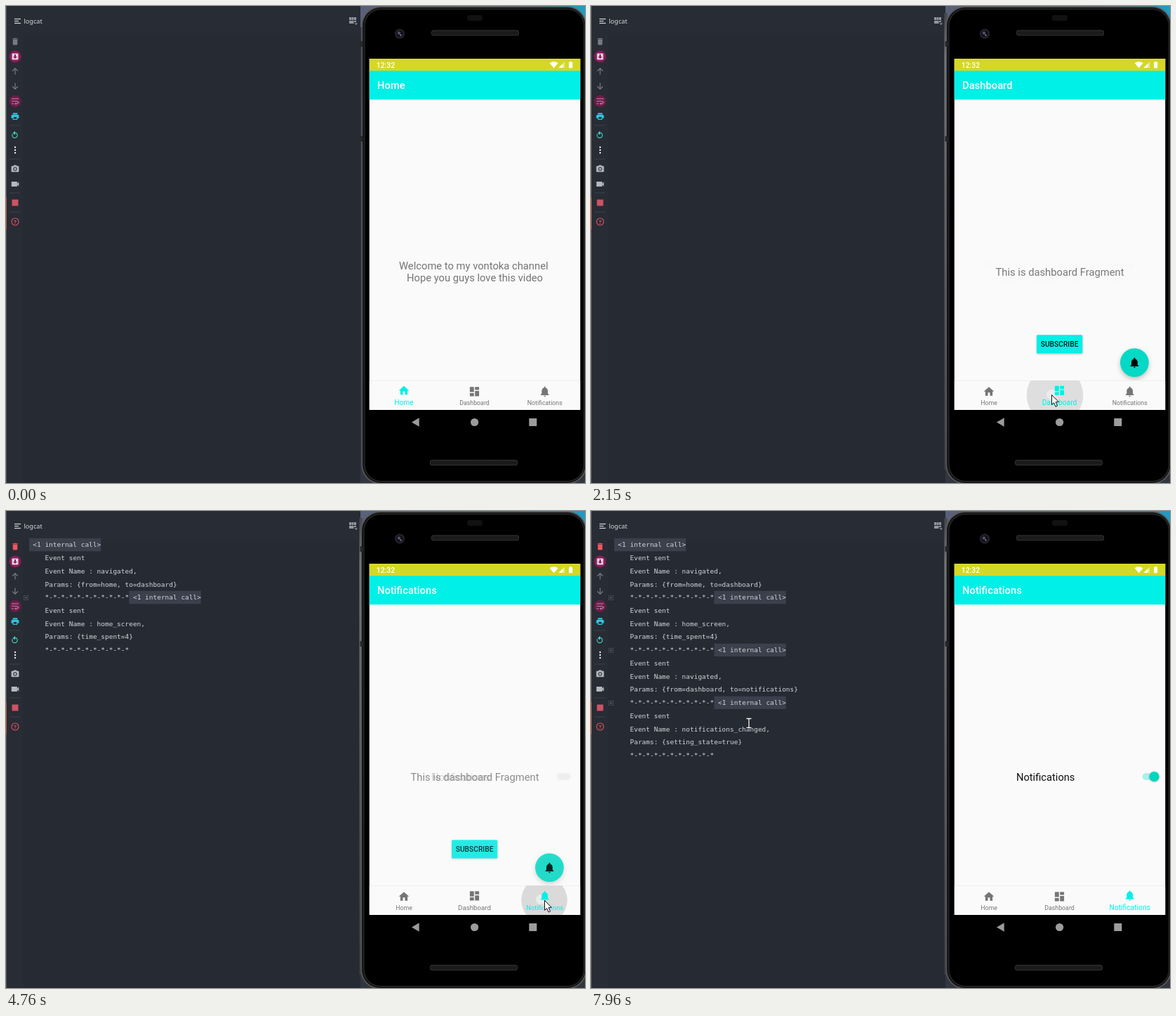
Animation of 825x679 px, one loop 8 s. Source, as an HTML page with a canvas:

```html
<!DOCTYPE html>
<html lang="en">
<head>
<meta charset="utf-8">
<title>Event log demo</title>
<style>
html, body { margin: 0; width: 825px; height: 679px; overflow: hidden; background: #262a33; }
canvas { display: block; }
</style>
</head>
<body>
<canvas id="stage" width="825" height="679"></canvas>
<script>
const LOOP = 8000;
const g = document.getElementById('stage').getContext('2d');
const ROBOTO = 'Roboto, sans-serif', MONO = '"DejaVu Sans Mono", monospace';
const CYAN = '#00f0e7', GRAY = '#757575', PAPER = '#fafafa';

const ICON = {
  home: new Path2D('M10 20v-6h4v6h5v-8h3L12 3 2 12h3v8z'),
  dash: new Path2D('M3 13h8V3H3zM3 21h8v-6H3zM13 21h8V11h-8zM13 3v6h8V3z'),
  bell: new Path2D('M12 22c1.1 0 2-.9 2-2h-4c0 1.1.89 2 2 2zm6-6v-5c0-3.07-1.64-5.64-4.5-6.32V4c0-.83-.67-1.5-1.5-1.5s-1.5.67-1.5 1.5v.68C7.63 5.36 6 7.92 6 11v5l-2 2v1h16v-1z'),
  trash: new Path2D('M6 19c0 1.1.9 2 2 2h8c1.1 0 2-.9 2-2V7H6zM19 4h-3.5l-1-1h-5l-1 1H5v2h14z'),
  print: new Path2D('M19 8H5c-1.66 0-3 1.34-3 3v6h4v4h12v-4h4v-6c0-1.66-1.34-3-3-3zM16 19H8v-5h8zM18 3H6v4h12z'),
  camera: new Path2D('M9 2L7.2 4H4c-1.1 0-2 .9-2 2v12c0 1.1.9 2 2 2h16c1.1 0 2-.9 2-2V6c0-1.1-.9-2-2-2h-3.2L15 2zM12 17a5 5 0 0 1 0-10a5 5 0 0 1 0 10z'),
  video: new Path2D('M17 10.5V6H3v12h14v-4.5l4 4v-11z')
};

// Pointer path: time, x, y
const PATH = [
  [400, 551, 644], [700, 586, 612], [1000, 636, 566], [1200, 653.5, 551], [1250, 655, 553], [1300, 656, 553],
  [2860, 656, 553], [2950, 590, 488], [3100, 340, 253], [3250, 273, 188], [3340, 271, 187], [3500, 470, 370],
  [3640, 660, 522], [3700, 704, 553], [3740, 710, 545], [3820, 730, 529], [3990, 763, 557],
  [4140, 763, 557], [4330, 767, 555], [4380, 767, 554], [5700, 767, 553], [5850, 766, 525], [6150, 779, 440],
  [6400, 789, 386], [6530, 791, 376], [7600, 791, 376], [7700, 650, 362], [7830, 390, 328], [7960, 225, 302]
];

const BLOCKS = [
  [2200, 'navigated', 'from=home, to=dashboard'],
  [2250, 'home_screen', 'time_spent=4'],
  [4930, 'navigated', 'from=dashboard, to=notifications'],
  [7510, 'notifications_changed', 'setting_state=true']
];

const TABS = [['Home', 'home', 567], ['Dashboard', 'dash', 667.5], ['Notifications', 'bell', 767.7]];
const SWITCHES = [[1930, 0, 1], [4720, 1, 2]];

const ramp = (t, a, b) => Math.min(1, Math.max(0, (t - a) / (b - a)));
const ease = p => p * p * (3 - 2 * p);
const mix = (a, b, p) => a + (b - a) * p;

function rect(x, y, w, h, color, r = 0) {
  g.fillStyle = color;
  g.beginPath();
  g.roundRect(x, y, w, h, r);
  g.fill();
}
function disc(x, y, r, color) {
  g.fillStyle = color;
  g.beginPath();
  g.arc(x, y, r, 0, 7);
  g.fill();
}
function poly(points, color) {
  g.fillStyle = color;
  g.beginPath();
  points.forEach(p => g.lineTo(...p));
  g.closePath();
  g.fill();
}
function line(points, color, w = 1.1) {
  g.strokeStyle = color;
  g.lineWidth = w;
  g.beginPath();
  points.forEach((p, i) => i ? g.lineTo(...p) : g.moveTo(...p));
  g.stroke();
}
function text(s, x, y, size, color, font = ROBOTO, align = 'left', weight = 400) {
  g.font = `${weight} ${size}px ${font}`;
  g.textAlign = align;
  g.fillStyle = color;
  g.fillText(s, x, y);
}
function icon(name, x, y, size, color) {
  g.save();
  g.translate(x - size / 2, y - size / 2);
  g.scale(size / 24, size / 24);
  g.fillStyle = color;
  g.fill(ICON[name], 'evenodd');
  g.restore();
}
function faded(alpha, draw) {
  if (alpha <= 0) return;
  g.save();
  g.globalAlpha = alpha;
  draw();
  g.restore();
}
// Shadows thin out faster than their shape so that they do not show through it
function shadow(alpha, blur, y) {
  g.shadowColor = `rgba(0,0,0,${alpha * g.globalAlpha ** 2})`;
  g.shadowBlur = blur;
  g.shadowOffsetY = y;
}

function toolbar(t) {
  rect(0, 0, 506, 42, '#282c34');
  rect(0, 42, 24, 637, '#282c34');
  rect(0, 0, 1, 679, '#50555e');
  rect(0, 272, 1, 46, '#c2543f');
  const pale = '#d4d8de', dim = '#80858e', soft = '#92969e';
  [[18.5, 9], [21.5, 6], [24.5, 9]].forEach(([y, w]) => rect(12, y - .6, w, 1.2, pale));
  text('logcat', 25.5, 24.5, 9.1, pale, '"Noto Sans", sans-serif');
  for (let i = 0; i < 3; i++) rect(489 + i * 3.5, 16, 3, 4, soft);
  rect(489, 21, 6.5, 4, soft);
  rect(496, 21, 3, 2, soft);
  poly([[496.5, 24.5], [501, 24.5], [498.8, 27]], soft);

  icon('trash', 13, 50.5, 13, t < BLOCKS[0][0] ? '#777b82' : '#f2545f');
  disc(13, 72, 8.5, '#8a1b5b');
  rect(8.5, 67.5, 9, 9, '#e3d3de', 1);
  rect(12, 69, 2, 3, '#8a1b5b');
  poly([[10, 72], [16, 72], [13, 75]], '#8a1b5b');
  for (const [y, d] of [[93, 1], [114, -1]]) {
    line([[13, y + 4.5 * d], [13, y - 4 * d]], dim);
    line([[9, y - .3 * d], [13, y - 4.2 * d], [17, y - .3 * d]], dim);
  }
  disc(13, 135.5, 8.5, '#701b4b');
  line([[8, 132], [18, 132]], '#a98a9c');
  line([[8, 139], [11, 139]], '#a98a9c');
  line([[8, 135.5], [16, 135.5], [18, 137.2], [16, 139], [13.5, 139]], '#a98a9c');
  poly([[12.2, 139], [14.5, 137], [14.5, 141]], '#a98a9c');
  icon('print', 13, 157, 13, '#30c5df');
  g.strokeStyle = '#45cfc0';
  g.lineWidth = 1.2;
  g.beginPath();
  g.arc(12.5, 184, 3.7, -1.4, 3.6);
  g.stroke();
  poly([[9.5, 181], [13, 178], [13, 183.5]], '#45cfc0');
  [201, 205, 209].forEach(y => disc(13, y, 1.2, '#e8eaed'));
  [170, 218, 266, 293].forEach(y => rect(5, y - .5, 15, 1, '#3d424b'));
  icon('camera', 13, 232, 13, '#b4b8bf');
  disc(13, 232, 1.7, '#b4b8bf');
  icon('video', 13, 253.5, 14, '#b4b8bf');
  rect(8.5, 275.5, 9, 9, '#cd5364');
  g.strokeStyle = '#e35566';
  g.lineWidth = 1.1;
  g.beginPath();
  g.arc(13, 307, 5, 0, 7);
  g.stroke();
  text('?', 13, 310, 8, '#e35566', ROBOTO, 'center', 700);
}

function log(t) {
  const shown = BLOCKS.filter(b => t >= b[0]);
  const put = (s, x, row) => text(s, x, 51.3 + 18.74 * row, 9.47, '#d2d5da', MONO);
  const stars = '*-'.repeat(10) + '*';
  shown.forEach(([, name, params], k) => {
    const row = 4 * k, y = 48 + 18.74 * row;
    rect(k ? 175.5 : 33, y - 9.2, 102.3, 18.4, '#3a404c');
    put('<1 internal call>', k ? 181 : 38.3, row);
    if (k) {
      put(stars, 55.5, row);
      g.strokeStyle = '#454a53';
      g.lineWidth = 1;
      g.strokeRect(25.5, y - 2.5, 6, 6);
      line([[27, y + .5], [30, y + .5]], '#5a5f68', 1);
      line([[28.5, y - 1], [28.5, y + 2]], '#5a5f68', 1);
    }
    put('Event sent', 55.5, row + 1);
    put(`Event Name : ${name},`, 55.5, row + 2);
    put(`Params: {${params}}`, 55.5, row + 3);
  });
  if (shown.length) put(stars, 55.5, 4 * shown.length);
}

function speaker(x, y) {
  rect(x, y, 125, 8, '#343434', 3.5);
  rect(x + 1, y + 1, 123, 6, '#161616', 3);
  for (let i = 0; i < 60; i++) {
    for (let j = 0; j < 2; j++) rect(x + 3 + i * 2, y + 2 + j * 2.5, 1, 1, '#303030');
  }
}

function phone(t) {
  const focus = t >= 1810;
  rect(505, 0, 320, 679, '#32363f');
  const sky = g.createLinearGradient(505, 0, 825, 0);
  sky.addColorStop(0, '#5a6078');
  sky.addColorStop(.6, '#56708c');
  sky.addColorStop(1, '#1f9cc2');
  rect(505, 0, 320, 30, sky);
  if (focus) {
    const strip = g.createLinearGradient(0, 10, 0, 660);
    strip.addColorStop(0, '#44474d');
    strip.addColorStop(.1, '#7a7c80');
    strip.addColorStop(.3, '#6b6d70');
    strip.addColorStop(1, '#3a3d43');
    rect(503.5, 10, 4, 650, strip);
  }
  const left = focus ? 505.5 : 506.5;
  rect(left, .5, 825 - left + 2, 680, '#5a5a5c', 27);
  rect(left + 1.5, 2, 825 - left - 1, 677, '#151516', 26);
  rect(left + 4, 4, 825 - left - 5, 673, '#303032', 24);
  rect(left + 5, 5, 825 - left - 7, 671, '#000', 23);
  [54, 189].forEach(y => rect(504.5, y - 4, 4, 8, '#25272b', 1));
  rect(657, 13, 22, 8, '#111', 3);
  disc(561, 39.5, 7, '#25252a');
  disc(561, 39.5, 4.8, '#0d0e18');
  disc(560, 38.5, 2.2, '#50506a');
  disc(562.5, 41.5, 1.2, '#777784');
  speaker(606, 34.3);
  speaker(604, 646);
  poly([[578, 592.5], [588.7, 586.3], [588.7, 598.7]], '#9c9c9c');
  disc(667.6, 592.5, 5.6, '#9c9c9c');
  rect(745.3, 587, 11, 11, '#9c9c9c', .5);
}

function statusBar() {
  rect(517.5, 75, 301, 18, '#d5d726');
  text('12:32', 527.8, 88, 10.35, '#fff', ROBOTO, 'left', 500);
  g.fillStyle = '#fff';
  g.beginPath();
  g.moveTo(780.6, 88.3);
  g.lineTo(774.6, 81.3);
  g.quadraticCurveTo(780.6, 77, 786.6, 81.3);
  g.fill();
  poly([[787.5, 88], [796, 88], [796, 79.5]], '#e9eb95');
  poly([[787.5, 88], [793, 88], [793, 82.5]], '#fff');
  rect(802, 80, 5.2, 8.3, '#fff', .7);
  rect(803.4, 79, 2.4, 1.5, '#fff');
}

function homePage() {
  text('Welcome to my vontoka channel', 560, 375, 14.75, GRAY);
  text('Hope you guys love this video', 668, 392.2, 14.75, GRAY, ROBOTO, 'center');
}

function dashPage() {
  text('This is dashboard Fragment', 668, 383.7, 14.75, GRAY, ROBOTO, 'center');
  g.save();
  shadow(.25, 3, 1);
  rect(635, 468.2, 65.3, 26.4, CYAN, 1.5);
  shadow(.25, 6, 3);
  disc(774.4, 507.6, 20.4, '#00dac6');
  g.restore();
  text('SUBSCRIBE', 667.6, 485.2, 10.25, '#101616', ROBOTO, 'center', 500);
  icon('bell', 774.4, 507.8, 17.6, '#000');
}

function settingsPage(t) {
  const p = ease(ramp(t, 7250, 7460));
  text('Notifications', 647.7, 383.7, 14.7, '#111', ROBOTO, 'center');
  rect(785.5, 373.2, 19, 9.8, p < .4 ? '#b2b2b2' : '#b0eee8', 5);
  g.save();
  shadow(.3, 2, .7);
  disc(mix(788, 802.5, p), 378, 7.1, p < .4 ? '#ececec' : '#00d5c0');
  g.restore();
}

function ripple(t, start, grow, end, x, from) {
  if (t < start || t >= end) return;
  const r = mix(from, 40.3, ease(ramp(t, grow, grow + 180)));
  faded(1 - ramp(t, end - 220, end), () => {
    disc(x, 554, r, '#dadada');
    disc(x - 5, 553, 7, 'rgba(255,255,255,.45)');
  });
}

function app(t) {
  g.save();
  g.beginPath();
  g.rect(517.5, 75, 301, 500);
  g.clip();
  rect(517.5, 75, 301, 500, PAPER);
  let tab = 0, prev = 0, p = 1, started = 0;
  for (const [at, a, b] of SWITCHES) {
    if (t >= at) [prev, tab, p, started] = [a, b, ramp(t, at, at + 115), at];
  }
  const f = started ? ramp(t, started + 5, started + 225) : 1;
  const pages = [homePage, dashPage, () => settingsPage(t)];
  faded(f, pages[tab]);
  if (f < 1) faded(1 - f, pages[prev]);

  statusBar();
  rect(517.5, 92.3, 301, 41, CYAN);
  text(TABS[tab][0], 529, 118.3, 14.75, '#fff', ROBOTO, 'left', 500);

  g.beginPath();
  g.rect(517.5, 533, 301, 42);
  g.clip();
  rect(517.5, 533, 301, 1, '#efefef');
  rect(517.5, 534, 301, 41, PAPER);
  ripple(t, 1810, 1810, 2340, 661, 8);
  ripple(t, 4520, 4640, 5040, 767, 10.5);
  TABS.forEach(([label, name, x], i) => {
    const k = i === tab ? p : i === prev ? 1 - p : 0;
    const color = i === tab ? CYAN : GRAY;
    icon(name, x, 548.8 - 1.4 * k, 17.6, color);
    text(label, x, 568, mix(8.79, 10.25, k), color, ROBOTO, 'center');
  });
  g.restore();
}

function pointer(t) {
  if (t < PATH[0][0]) return;
  let i = PATH.findIndex(k => k[0] > t);
  if (i < 0) i = PATH.length - 1;
  const a = PATH[i - 1], b = PATH[i], p = ramp(t, a[0], b[0]);
  const x = mix(a[1], b[1], p), y = mix(a[2], b[2], p);
  g.save();
  g.translate(x, y);
  if (x < 504) {
    const bar = () => {
      g.beginPath();
      g.moveTo(-3.5, -6.5); g.lineTo(3.5, -6.5);
      g.moveTo(0, -6.5); g.lineTo(0, 6.5);
      g.moveTo(-3.5, 6.5); g.lineTo(3.5, 6.5);
      g.stroke();
    };
    g.strokeStyle = '#15171b';
    g.lineWidth = 3;
    bar();
    g.strokeStyle = '#fff';
    g.lineWidth = 1.3;
    bar();
  } else {
    poly([[.5, .5], [.5, 14.6], [3.6, 11.7], [6, 17.3], [8.5, 16.2], [6.1, 10.8], [10.2, 10.6]], '#fff');
    g.strokeStyle = '#111';
    g.lineWidth = 1;
    g.stroke();
  }
  g.restore();
}

function frame(now) {
  const t = now % LOOP;
  rect(0, 0, 825, 679, '#262a33');
  toolbar(t);
  log(t);
  phone(t);
  app(t);
  pointer(t);
}

const begin = performance.now();
function tick() {
  frame(performance.now() - begin);
  requestAnimationFrame(tick);
}
tick();
</script>
</body>
</html>
```
